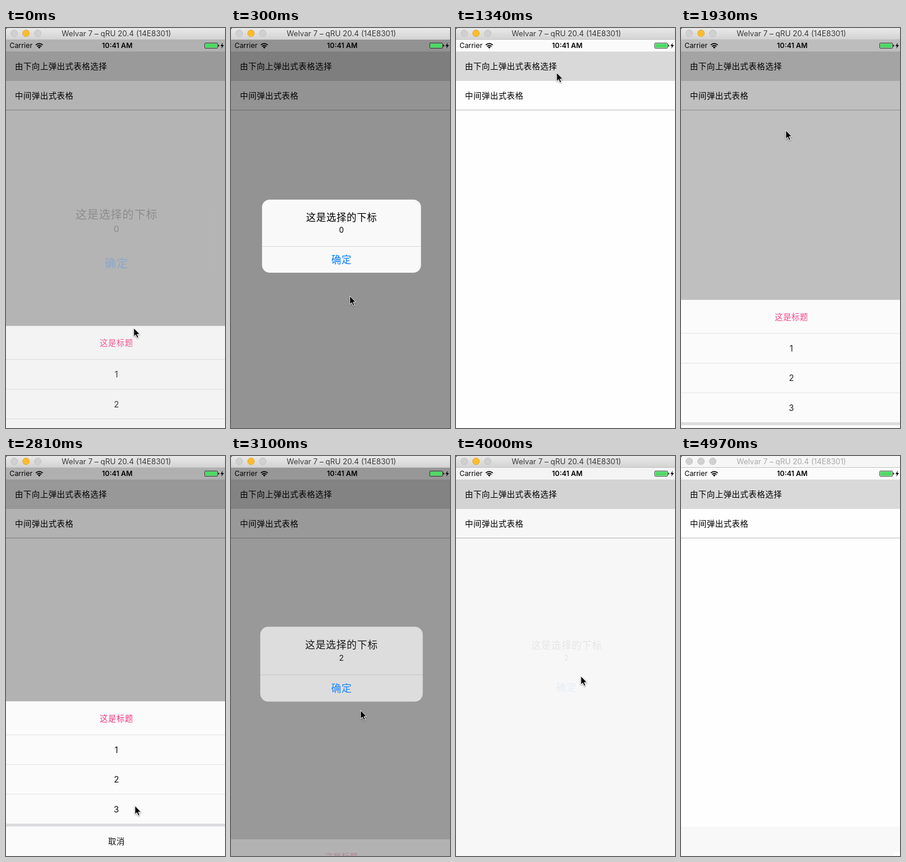
These frames come from a looping animation (372 by 680 pixels, 5070 ms). An HTML page:

```html
<!DOCTYPE html>
<html lang="zh-CN">
<head>
<meta charset="utf-8">
<title>弹出式表格</title>
<style>
  html, body { margin: 0; width: 100%; height: 100%; overflow: hidden; background: #fefefe; }
  svg { display: block; width: 372px; height: 680px; }
  text { font-family: Inter, "Noto Sans CJK SC", "Noto Sans CJK", sans-serif; }
  .mid { text-anchor: middle; }
  .row { font-size: 13.7px; letter-spacing: .04em; }
  .head { font-size: 16.6px; font-weight: 500; letter-spacing: .04em; }
  .status { font-size: 11.9px; }
  #cursor { filter: drop-shadow(0 1px 1px #0006); }
</style>
</head>
<body>
<svg viewBox="0 0 372 680">
  <defs>
    <linearGradient id="chrome" x2="0" y2="1">
      <stop stop-color="#e9e9e9"/><stop offset="1" stop-color="#d2d2d2"/>
    </linearGradient>
    <clipPath id="card"><rect x="52.7" y="291.7" width="270" height="124.3" rx="13"/></clipPath>
  </defs>

  <rect width="372" height="680" fill="#fefefe"/>
  <rect y="20" width="372" height="20" fill="#fbfbfb"/>
  <rect y="40" width="372" height="50" fill="#d9d9d9"/>
  <rect y="139" width="372" height="1" fill="#bcbcbc"/>
  <text class="row" x="15.2" y="70.2">由下向上弹出式表格选择</text>
  <text class="row" x="15.2" y="120.2">中间弹出式表格</text>
  <path id="band" d="M0 630H372V673H361V680H0Z" fill="#f8f8f8"/>

  <rect id="sheetDim" y="20" width="372" height="660"/>
  <g id="sheet">
    <rect width="372" height="264" fill="#fbfbfc"/>
    <rect y="208" width="372" height="5" fill="#dcdcdf"/>
    <path d="M0 57H372M0 107.5H372M0 158H372" stroke="#e3e3e5"/>
    <g id="sheetText" class="mid" font-size="14.28" fill="#111">
      <text class="row" x="187.8" y="34" fill="#f4397f">这是标题</text>
      <text x="187.5" y="87.7">1</text>
      <text x="187.5" y="138.2">2</text>
      <text x="187.5" y="188.7">3</text>
      <text class="row" x="187.8" y="243.3">取消</text>
    </g>
  </g>

  <rect id="alertDim" y="20" width="372" height="660"/>
  <g id="alert">
    <g id="box" clip-path="url(#card)">
      <rect x="52" y="291" width="272" height="126" fill="#f9f9f9"/>
      <rect x="52" y="371" width="272" height="1" fill="#dadada"/>
      <rect id="press" x="52" y="371" width="272" height="46" fill="#e9e9e9"/>
    </g>
    <g id="alertText" class="mid">
      <text class="head" x="187.8" y="328">这是选择的下标</text>
      <text id="picked" x="187.5" y="347.8" font-size="13">0</text>
      <text class="head" x="187.8" y="400.2" fill="#007aff">确定</text>
    </g>
  </g>

  <g id="statusBar">
    <text class="status" x="6" y="34.4">Carrier</text>
    <path d="M50.6 28.9Q56.5 23.7 62.4 28.9M52.7 31.3Q56.5 28 60.3 31.3" fill="none" stroke="#000" stroke-width="1.7"/>
    <path d="M54.2 32.4Q56.5 30.7 58.8 32.4L56.5 34.9Z"/>
    <text class="status mid" x="189" y="34.4" font-weight="600">10:41 AM</text>
    <rect x="337.5" y="25.5" width="22" height="9" rx="1.5" fill="none" stroke="#222" stroke-width=".8"/>
    <rect x="338.5" y="26.5" width="20" height="7" rx=".6" fill="#4cd964"/>
    <path d="M360.5 28.3Q362.2 28.5 362.2 30T360.5 31.7Z"/>
    <path d="M368.3 25L364.3 30.7H366.9L365.7 35L370.2 28.9H367.4Z"/>
  </g>

  <g id="titleBar">
    <rect id="bar" width="372" height="20"/>
    <rect y="19" width="372" height="1" fill="#c4c4c4"/>
    <path d="M0 0H2L0 2Z" fill="#333"/>
    <g fill="#d0d0d0" stroke="#bdbdbd" stroke-width=".8">
      <circle cx="14" cy="9" r="5.7"/>
      <circle id="amber" cx="34" cy="9" r="5.7"/>
      <circle cx="54" cy="9" r="5.7"/>
    </g>
    <text id="title" class="mid" x="187.5" y="14" font-size="12.8">Welvar 7 – qRU 20.4 (14E8301)</text>
  </g>

  <path id="cursor" d="M0 0V14.6L3.3 11.6L5.7 17L8.1 16L5.8 10.7H10.4Z" stroke="#fff"/>
</svg>

<script>
const LOOP = 5070, BLUR_AT = 4970, STEP = 147.6, LAST_STEP = 31;
const SHEET_HEIGHT = 263;

// Each round: the sheet rises, a row is picked, the alert pops up and is closed.
const rounds = [
  { pick: 0, index: 0, close: 1035 },
  { pick: 2952, index: 2, close: 3733 }
];

// Places the pointer visits: time, x, y.
const stops = [
  [0, 217, 510], [600, 186, 399], [1040, 186, 399],
  [1328, 171, 76], [1640, 171, 76], [1919, 178, 174],
  [2300, 219, 597], [2800, 219, 597], [3100, 220, 432],
  [3500, 211, 376], [3985, 212, 374], [4428, 361, 673], [4576, 400, 720]
];

const $ = id => document.getElementById(id);
const attr = (id, name, value) => $(id).setAttribute(name, value);
const fade = (id, value) => attr(id, "opacity", value);
const move = (id, value) => attr(id, "transform", value);
const show = (id, on) => attr(id, "visibility", on ? "visible" : "hidden");

// Smooth 0 to 1 ramp from a start time over a duration.
function ramp(t, from, duration) {
  const x = Math.min(1, Math.max(0, (t - from) / duration));
  return x * x * (3 - 2 * x);
}

function drawSheet(t) {
  const rise = ramp(t, -1302, 365);
  const open = rise * (1 - ramp(t, -143, 365));
  move("sheet", `translate(0 ${680 - SHEET_HEIGHT * open})`);
  fade("sheetText", Math.sqrt(open));
  fade("sheetDim", .3 * rise * (1 - ramp(t, -100, 500)));
}

function drawAlert(t, close) {
  const pop = ramp(t, -90, 300);
  const stay = 1 - ramp(t, close, 300);
  const alpha = pop * stay;
  move("alert", `translate(187.6 353.8) scale(${1.2 - .2 * pop}) translate(-187.6 -353.8)`);
  fade("alertText", alpha);
  fade("box", alpha ** 3);
  fade("alertDim", .4 * ramp(t, -50, 300) * stay);
  show("press", t > close - STEP && t <= close);
}

function drawCursor(t) {
  const next = Math.max(1, stops.findIndex(([at]) => at >= t));
  const [t0, x0, y0] = stops[next - 1], [t1, x1, y1] = stops[next];
  const k = Math.min(1, (t - t0) / (t1 - t0));
  move("cursor", `translate(${x0 + (x1 - x0) * k} ${y0 + (y1 - y0) * k})`);
}

function drawTitleBar(active) {
  attr("bar", "fill", active ? "url(#chrome)" : "#f6f6f6");
  attr("amber", "fill", active ? "#fdbc2e" : "#d0d0d0");
  attr("amber", "stroke", active ? "#e0a028" : "#bdbdbd");
  attr("title", "fill", active ? "#3a3a3a" : "#a9a9a9");
}

function draw(time) {
  // The picture is held between steps.
  const t = STEP * Math.min(LAST_STEP, Math.floor(time / STEP));
  const { pick, index, close } = rounds[t < 1600 ? 0 : 1];
  drawSheet(t - pick);
  drawAlert(t - pick, close - pick);
  $("picked").textContent = index;
  drawCursor(Math.min(t, stops.at(-1)[0]));
  drawTitleBar(time < BLUR_AT);
  show("band", t > 4100);
}

const start = performance.now();
function tick() {
  draw((performance.now() - start) % LOOP);
  requestAnimationFrame(tick);
}
tick();
</script>
</body>
</html>
```
